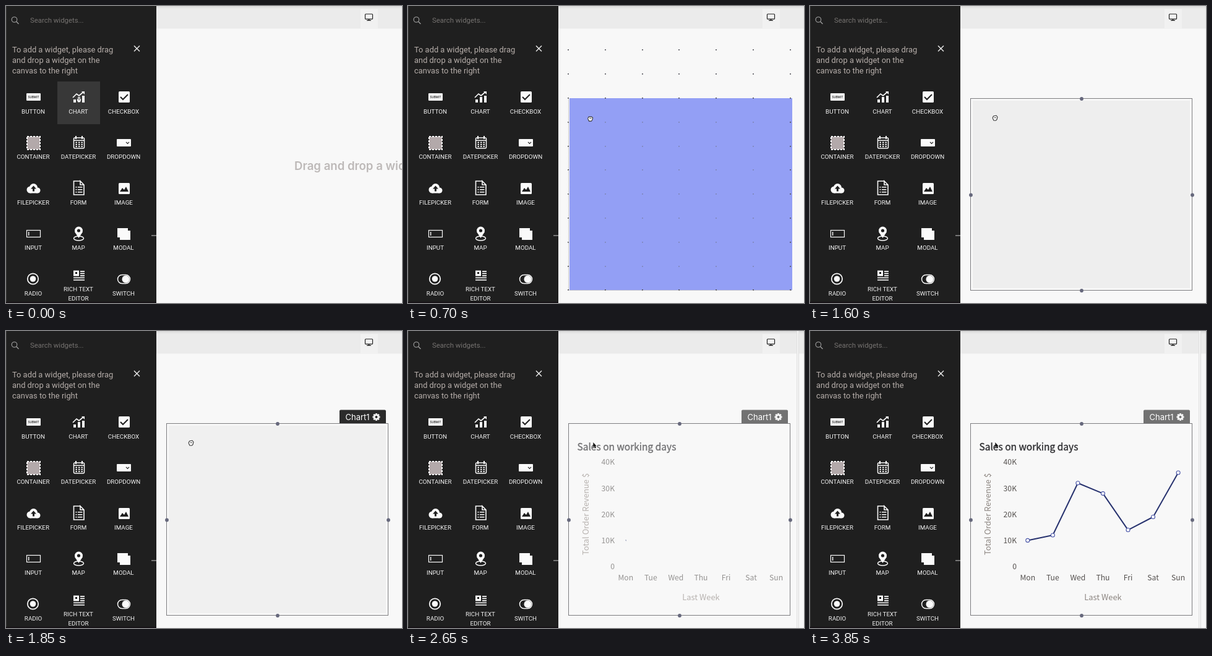
An HTML page with a canvas that plays this animation: 640x480 px, repeating every 5.9 s.

```html
<!DOCTYPE html>
<html lang="en">
<head>
<meta charset="utf-8">
<title>Widget drag and drop</title>
<style>
html, body { margin: 0; width: 100%; height: 100%; overflow: hidden; background: #f8f8f8; }
canvas { display: block; }
</style>
</head>
<body>
<canvas id="stage" width="640" height="480"></canvas>
<script>
const ctx = document.getElementById('stage').getContext('2d');
const LOOP = 5900;
const DARK = '#1f1f1f', WHITE = '#fafafa', PAGE = '#f8f8f8';
const UI = 'Roboto, sans-serif';
const PLOT = '"Noto Sans CJK SC", "Noto Sans CJK JP", "Noto Sans", sans-serif';

// Key moments in ms
const T = { drag: 150, ghost: 650, drop: 1400, tag: 1700, idle: 2100, pane: 2150, chart: 2600, line: 2650, lineEnd: 3200, marks: 3200 };

const clamp = v => Math.max(0, Math.min(1, v));
const span = (t, a, b) => clamp((t - a) / (b - a));
const smooth = u => u * u * (3 - 2 * u);

function rect(x, y, w, h, color) {
  ctx.fillStyle = color;
  ctx.fillRect(x, y, w, h);
}

function round(x, y, w, h, r, color) {
  ctx.beginPath();
  ctx.roundRect(x, y, w, h, r);
  ctx.fillStyle = color;
  ctx.fill();
}

function frame(x, y, w, h, color, width = 1) {
  ctx.strokeStyle = color;
  ctx.lineWidth = width;
  ctx.strokeRect(x, y, w, h);
}

function disc(x, y, r, fill, stroke, width = 1) {
  ctx.beginPath();
  ctx.arc(x, y, r, 0, 7);
  if (fill) { ctx.fillStyle = fill; ctx.fill(); }
  if (stroke) { ctx.strokeStyle = stroke; ctx.lineWidth = width; ctx.stroke(); }
}

function trace(points) {
  ctx.beginPath();
  for (let i = 0; i < points.length; i += 2) ctx.lineTo(points[i], points[i + 1]);
}

function line(points, color, width = 1) {
  trace(points);
  ctx.strokeStyle = color;
  ctx.lineWidth = width;
  ctx.stroke();
}

function poly(points, color) {
  trace(points);
  ctx.closePath();
  ctx.fillStyle = color;
  ctx.fill();
}

function text(str, x, y, font, color, align = 'left') {
  ctx.font = font;
  ctx.fillStyle = color;
  ctx.textAlign = align;
  ctx.fillText(str, x, y);
}

// Icons are drawn around their own centre
const icons = {
  BUTTON() {
    round(-11, -6, 23, 12, 1, WHITE);
    text('SUBMIT', 0.5, 1.8, `500 5px ${UI}`, '#333', 'center');
  },
  CHART() {
    [[-8, 5], [-1, 9], [6, 11]].forEach(([x, h]) => rect(x, 9 - h, 4, h, WHITE));
    line([-9, 1, -3, -5, 1, -2, 8, -8], WHITE, 1.7);
    poly([5, -9, 10, -9, 10, -4], WHITE);
  },
  CHECKBOX() {
    round(-8, -9, 18, 18, 1.5, WHITE);
    line([-5, 0, -1, 4, 7, -4], DARK, 2);
  },
  CONTAINER() {
    rect(-10, -10, 21, 21, '#b3a9aa');
    ctx.setLineDash([3, 2]);
    frame(-10, -10, 21, 21, WHITE, 2);
    ctx.setLineDash([]);
  },
  DATEPICKER() {
    ctx.beginPath();
    ctx.roundRect(-7.5, -8, 17, 17, 2);
    ctx.strokeStyle = WHITE;
    ctx.lineWidth = 1.5;
    ctx.stroke();
    rect(-7, -4.5, 16, 1.5, WHITE);
    rect(-5, -11, 2, 5, WHITE);
    rect(5, -11, 2, 5, WHITE);
    for (let i = 0; i < 9; i++) rect(-4.5 + i % 3 * 4.5, -1.5 + (i / 3 | 0) * 3.3, 2.4, 2, WHITE);
  },
  DROPDOWN() {
    round(-11, -6, 23, 12, 1, WHITE);
    line([4, -1.2, 6.5, 1.3, 9, -1.2], DARK, 1.2);
  },
  FILEPICKER() {
    disc(-5, 3, 5.5, WHITE);
    disc(0.5, -0.5, 6.5, WHITE);
    disc(7, 4, 4.5, WHITE);
    rect(-5, 3, 12, 5.5, WHITE);
    poly([0.5, -3.5, 5, 1.5, -4, 1.5], DARK);
    rect(-1, 0.5, 3, 5, DARK);
  },
  FORM() {
    line([3, -11, -7.5, -11, -7.5, 11, 9, 11, 9, -5, 3, -11, 3, -5, 9, -5], WHITE, 1.6);
    [-2, 2, 6].forEach(y => {
      rect(-4.5, y, 2, 1.5, WHITE);
      rect(-1, y, 7.5, 1.5, WHITE);
    });
  },
  IMAGE() {
    round(-8, -8, 18, 18, 1.5, WHITE);
    poly([-6, 6, -2, 0, 1, 3, 4, -2, 8, 6], DARK);
  },
  INPUT() {
    frame(-10.5, -5.5, 22, 11, WHITE, 1.2);
    rect(-8, -3, 1.4, 6, WHITE);
  },
  MAP() {
    ctx.beginPath();
    ctx.ellipse(0.5, 7.5, 8, 3.5, 0, 0, 7);
    ctx.strokeStyle = WHITE;
    ctx.lineWidth = 1.5;
    ctx.stroke();
    poly([-6, -3, 7, -3, 0.5, 7], WHITE);
    disc(0.5, -5, 6.5, WHITE);
    disc(0.5, -5, 2.6, DARK);
  },
  MODAL() {
    rect(-10, -9, 17, 15, WHITE);
    rect(-6, -5, 17, 15, WHITE);
  },
  RADIO() {
    disc(-0.5, 0, 8.7, null, WHITE, 1.7);
    disc(-0.5, 0, 4.8, WHITE);
  },
  'RICH TEXT'() {
    rect(-8, -6.5, 9, 9, WHITE);
    rect(-5, -4, 3, 3, DARK);
    [-6, -2.5, 1].forEach(y => rect(3, y, 7, 1.8, WHITE));
    [4.5, 8].forEach(y => rect(-8, y, 18, 1.6, WHITE));
  },
  SWITCH() {
    ctx.beginPath();
    ctx.roundRect(-9.5, -6.5, 20, 14, 7);
    ctx.strokeStyle = WHITE;
    ctx.lineWidth = 1.5;
    ctx.stroke();
    disc(3.5, 0.5, 6, WHITE);
  }
};

function sidebar(t) {
  rect(0, 0, 243, 480, DARK);
  rect(0, 0, 1, 480, '#3b3b3b');
  rect(0, 478, 242, 2, '#171317');
  rect(235, 370.5, 8, 1, '#cfcfcf');

  disc(13.5, 22, 4.3, null, '#a5a5a5', 1.1);
  line([16.7, 25.3, 20.5, 29], '#a5a5a5', 1.2);
  text('Search widgets...', 39, 27, `11.4px ${UI}`, '#757270');

  ['To add a widget, please drag', 'and drop a widget on the', 'canvas to the right']
    .forEach((s, i) => text(s, 10, 75 + i * 17.2, `12.9px ${UI}`, '#b6aeaa'));
  line([207, 64.3, 216, 73.3], '#e8e8e8', 1.5);
  line([216, 64.3, 207, 73.3], '#e8e8e8', 1.5);

  if (t < T.drag) rect(83, 122, 69, 69, '#383838');

  Object.keys(icons).forEach((name, i) => {
    const x = 44 + i % 3 * 73, y = 147 + (i / 3 | 0) * 73.6;
    const tall = name === 'RICH TEXT';
    const font = `9.8px ${UI}`;
    ctx.save();
    ctx.translate(x, Math.round(tall ? y - 7.5 : y));
    icons[name]();
    ctx.restore();
    text(name, x, y + (tall ? 19.2 : 26.5), font, '#f4f4f4', 'center');
    if (tall) text('EDITOR', x, y + 34.2, font, '#f4f4f4', 'center');
  });
}

function header() {
  rect(243, 0, 397, 36.5, '#ebebeb');
  const g = ctx.createLinearGradient(0, 0, 0, 5);
  g.addColorStop(0, '#dadada');
  g.addColorStop(1, '#ebebeb');
  rect(243, 0, 397, 5, g);
  rect(573, 5, 28, 31, '#f1f1f1');
  ctx.beginPath();
  ctx.roundRect(580.5, 13, 12, 8.2, 1);
  ctx.strokeStyle = '#222';
  ctx.lineWidth = 1.2;
  ctx.stroke();
  rect(585.5, 21.5, 2, 2, '#222');
  rect(583, 22.8, 7, 1.2, '#222');
}

function dropArea(t) {
  const ghost = t >= T.ghost;
  if (ghost) {
    rect(261, 149, 360, 310, '#939ff5');
    ctx.setLineDash([1, 1]);
    line([259.5, 149, 259.5, 459.5, 621, 459.5], '#9a9aa4');
    ctx.setLineDash([]);
  }
  const rows = ghost ? 11 : 6;
  for (let r = 0; r < rows; r++) {
    const covered = ghost && r > 2 && r < 10;
    for (let c = 0; c < 7; c++) {
      const faint = covered && c > 0 && c < 6;
      rect(Math.round(258 + c * 59.75), Math.round(70.3 + r * 38.8), 2, 1.6, faint ? '#7f86b8' : '#55555c');
    }
  }
}

function gear(x, y, hole) {
  for (let i = 0; i < 8; i++) {
    ctx.save();
    ctx.translate(x, y);
    ctx.rotate(i * Math.PI / 4);
    rect(-1.4, -6, 2.8, 4, WHITE);
    ctx.restore();
  }
  disc(x, y, 4.4, WHITE);
  disc(x, y, 2, hole);
}

function widget(t) {
  if (t < T.idle) {
    const pulse = 0.5 - 0.5 * Math.cos((t - T.drop) / 450 * Math.PI);
    const v = Math.round(236 + 4 * pulse);
    rect(263, 153, 351, 303, `rgb(${v},${v},${v})`);
  }
  frame(259.5, 149.5, 358, 310, '#7d7d80');
  [[439, 150], [260, 305.5], [618, 305.5], [439, 460]].forEach(([x, y]) => disc(x, y, 2.9, '#66687c'));
  const tone = t < T.idle ? '#2b2b2b' : '#727272';
  if (t >= T.tag) {
    round(539, 127.5, 75, 21.5, [2, 2, 0, 0], tone);
    text('Chart1', 548.5, 143.6, '13px Inter, sans-serif', '#fff');
    gear(598.5, 139, tone);
  }
}

const days = ['Mon', 'Tue', 'Wed', 'Thu', 'Fri', 'Sat', 'Sun'];
const sales = [10, 12, 32, 28, 14, 19, 36];
const px = i => 351.8 + i * 40.55;
const py = v => 380.5 - v * 4.21;

function chart(t) {
  const label = `12.2px ${PLOT}`, axis = `300 12.9px ${PLOT}`;
  ctx.globalAlpha = 0.4 + 0.6 * span(t, T.chart, T.chart + 150);
  text('Sales on working days', 273.5, 193, `500 15.5px ${PLOT}`, '#2d2d30');
  ctx.strokeStyle = '#2d2d30';
  ctx.lineWidth = 0.35;
  ctx.strokeText('Sales on working days', 273.5, 193);
  for (let v = 0; v <= 40; v += 10) text(v ? v + 'K' : '0', 334, py(v) + 4.3, label, '#55514f', 'right');
  days.forEach((d, i) => text(d, px(i), 402.8, label, '#55514f', 'center'));
  text('Last Week', 473.5, 434.8, axis, '#8c8580', 'center');
  ctx.save();
  ctx.translate(291.5, 296);
  ctx.rotate(-Math.PI / 2);
  text('Total Order Revenue $', 0, 0, axis, '#8c8580', 'center');
  ctx.restore();
  ctx.globalAlpha = 1;

  const reveal = span(t, T.line, T.lineEnd);
  if (reveal > 0) {
    ctx.save();
    ctx.beginPath();
    ctx.rect(350, 200, 2 + (px(6) - px(0)) * reveal + (reveal === 1 ? 3 : 0), 190);
    ctx.clip();
    ctx.lineJoin = 'round';
    line(sales.flatMap((v, i) => [px(i), py(v)]), '#28336f', 2);
    ctx.restore();
  }
  ctx.globalAlpha = span(t, T.marks, T.marks + 200);
  if (ctx.globalAlpha > 0) sales.forEach((v, i) => disc(px(i), py(v), 3, '#fff', '#4a56a8', 1.1));
  ctx.globalAlpha = 1;
}

function hand(x, y, open) {
  const shape = [x - 4, y, x - 2.5, y - 3, x + 2, y - (open ? 4 : 3), x + 4, y - 1.5,
    x + 3, y + 2.5, x + 1.5, y + 4, x - 2, y + 4, x - 4, y];
  poly(shape, '#fff');
  line(shape, '#333', 1.1);
  line([x - 1.5, y - 0.5, x + 2, y - 0.5], '#555', 1);
}

function cursor(t) {
  if (t >= T.idle) {
    ctx.save();
    ctx.translate(299.3, 180);
    poly([0, 0, 0, 8, 1.8, 6.6, 3.2, 9.4, 4.4, 8.8, 3.1, 6, 5.2, 5.7], '#161616');
    ctx.restore();
    return;
  }
  const s = smooth(span(t, 100, 750));
  const k = smooth(span(t, 1250, 1600));
  hand(118 + 179.5 * s + 1.5 * k, 152 + 31.5 * s ** 2.8 - 2.5 * k, t >= T.drop);
}

function draw(t) {
  rect(0, 0, 640, 480, PAGE);
  header();
  if (t < T.drag) text('Drag and drop a widget here', 466, 265, '600 18.6px Inter, sans-serif', '#bdb9b8');
  else if (t < T.drop) dropArea(t);
  else widget(t);
  if (t >= T.pane) {
    rect(628, 0, 1, 480, '#e0e0e0');
    rect(629, 0, 2, 480, '#f3f3f3');
    rect(631, 0, 1, 480, '#dedede');
  }
  if (t >= T.chart) chart(t);
  sidebar(t);
  cursor(t);
}

const start = performance.now();
function tick() {
  draw((performance.now() - start) % LOOP);
  requestAnimationFrame(tick);
}
tick();
</script>
</body>
</html>
```
